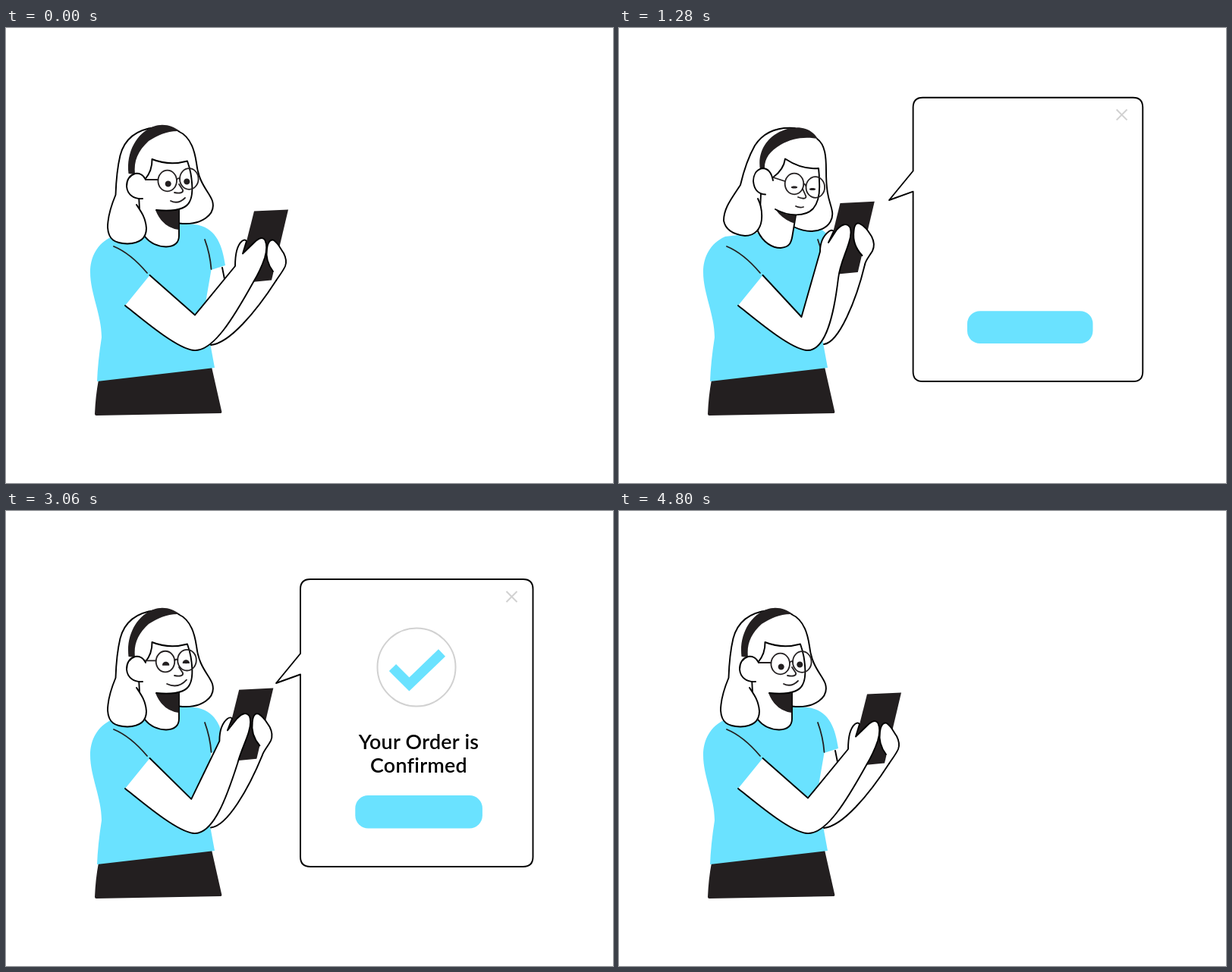
These frames come from a looping animation (800 px wide and 600 px high, 4.82 s). An HTML page:

```html
<!DOCTYPE html>
<html lang="en">
<head>
<meta charset="utf-8">
<title>Order confirmed</title>
<style>
  html, body { margin: 0; width: 100%; height: 100%; overflow: hidden; background: #fff; }
  svg { display: block; width: 100%; height: 100%; }
  .line { fill: none; stroke: #000; stroke-width: 1.9; stroke-linecap: round; stroke-linejoin: round; }
  .skin { fill: #fff; }
  .thin { stroke: #231f20; stroke-width: 1.8; }
  .ink { fill: #231f20; }
  .blue { fill: #6ae2ff; }
  .grey { fill: none; stroke: #d1d1d1; stroke-width: 2; }
  .tick { fill: none; stroke: #6ae2ff; stroke-width: 13; }
  text { font: 600 26.8px Lato, "Open Sans", sans-serif; letter-spacing: .3px; text-anchor: middle; }
</style>
</head>
<body>
<svg viewBox="0 0 800 600">
  <defs>
    <clipPath id="row1"><rect x="440" y="286" width="210" height="36"/></clipPath>
    <clipPath id="row2"><rect x="440" y="316" width="210" height="36"/></clipPath>
  </defs>

  <path class="ink" d="M122 464L271 447L284.3 506Q284.6 508 283 508L119 511Q117 511 117 509Q118 485 122 464Z"/>
  <path class="blue" d="M140 275C120 284 111 302 111 322C111 350 126 378 126 408Q121 440 120 466L275 448L268 410L262 368L270.5 319L289 313C285 285 276 262 248 259L220 256L183 270Z"/>
  <path class="line thin" d="M142 288Q164 297 186 323M262 279Q269 298 270.5 318"/>
  <path class="line" d="M285 316L288 331"/>

  <g id="head"></g>
  <g id="arms"></g>

  <g id="bubble">
    <path class="line skin" d="M388 188V103Q388 90 401 90H681.5Q694.5 90 694.5 103V456Q694.5 469 681.5 469H401Q388 469 388 456V215.5L356 227Z"/>
    <path class="grey" d="M659.5 106L673.5 120M673.5 106L659.5 120"/>
    <rect class="blue" x="460.3" y="375" width="167.6" height="43.5" rx="17"/>
    <circle id="ring" class="grey" cx="541" cy="206" r="51.5" pathLength="100" transform="rotate(-90 541 206)"/>
    <path id="tick" class="tick" pathLength="100" d="M509.5 206.5L531.5 228.5L574.5 187"/>
    <g clip-path="url(#row1)"><text id="text1" x="544" y="313.5">Your Order is</text></g>
    <g clip-path="url(#row2)"><text id="text2" x="544" y="344.7">Confirmed</text></g>
  </g>
</svg>
<script>
const LOOP = 4820;
const $ = id => document.getElementById(id);

// Each part: class, raised pose, lowered pose, optional smiling pose.
const headParts = [
  // right hair
  ['line skin',
    'M227 136C245 144 249 165 251 178C254 206 268 216 272 228C277 246 258 261 228 257.5',
    'M261 146C272 154 273 170 273 188C273 225 279 229 281 242C284 262 260 276 231 262.5'],
  // neck
  ['line skin',
    'M175 220L176 240L183 275C190 284 200 288 211 288.5C222 288 228 284 228 274L228 240',
    'M187 219L186 240L183 268C190 283 202 290 213 290C224 289 227 284 228.5 274L233 247'],
  // chin shadow
  ['ink',
    'M197 240Q212 242 227.5 239L227.5 266Q206 263 197 240Z',
    'M206 239Q218 247 233 246.5L231 257.5Q216 253 206 239Z'],
  // face
  ['line skin',
    'M183 200Q193 188 192.5 173Q215 182 239 175.5Q242 184 243.5 192C246 207 247 220 242 229C237 240 220 242 198 240',
    'M203 197Q217 187 219 172.5Q241 187 263 185Q264 193 264 203C265 219 262 231 256 238C246 249 224 249 206 239'],
  // left hair
  ['line skin',
    'M197 131C171 134 156 147 150.5 168C146 187 145 205 144.5 220C137 238 134 251 134 263C135 279 143 284 160 284.5C175 284 185 278 185 264C184 250 178 242 172 233',
    'M232 132C207 130 190 138 179 155C170 171 164 190 160 207C147 227 138 238 138 254C140 265 149 272 166 274C179 274 187 265 188 252C189 240 186 231 183 225'],
  // headband
  ['ink',
    'M161.5 192C158 163 173 138 194 130C207 125 220 129 229 136C214 135 200 141 188 149C174 162 168 175 170 193Z',
    'M186 187C182 163 195 142 219 134C234 129 252 130 262 146C245 143 228 145 213 154C198 163 191 173 192 187Z'],
  // ear
  ['line skin',
    'M184 200C181 193 175 191 170 192C161 195 159 202 159 209C160 220 169 226 180 225',
    'M203 201C201 191 196 185 189 185C180 187 177 195 177 202C178 213 184 219 193 219.5'],
  // nose and mouth
  ['line thin',
    'M228 206L233 213.5C234 217 230 218.5 222 217',
    'M242 212L246 221C248 225 243 226 236 223'],
  ['line thin',
    'M217 228Q227 233 236 224',
    'M233 235Q238 237.5 243 236',
    'M209.5 228Q227 236 239 222'],
  // glasses bridge and temple
  ['line thin',
    'M184 200L200.5 200M225 200Q227 197 229 199',
    'M203 197L218.5 202M243.5 206Q245 205 246 208',
    'M183 196L196 196M221 196Q222 193 225 195']
];

const armParts = [
  // far arm
  ['line skin',
    'M270 418C294 416 329 375 356 333',
    'M270 417C290 415 313 358 324 312'],
  // phone
  ['ink',
    'M327 241.5L372 239.5L350 332.5L303 337Z',
    'M291.5 231L336.8 228.7L314.8 322L268 326.5Z'],
  // far hand
  ['line skin',
    'M352 321C346 313 342 303 344 291C345 282 349 278 353 280C359 284 361 290 366 297C369 303 370 309 368 314C365 321 359 328 356 333',
    'M320.5 300C312 291 308 280 309.5 268C310 260 313 256 317 258C324 261 328 267 333 275C336 281 337 288 334 294C330 301 325 306 324 312'],
  // near arm and hand
  ['line skin',
    'M189.5 326L249 378.5L302 314C302 301 304 287 311 281Q315 278 317 281L312 297.5L327 283Q337 273 341.5 280C345 288 343 296 341 303C338 312 332 325 326 335C301 380 273 428 247 425C226 423 183 387 157 366',
    'M189.5 326L240.5 381L265 295C265 284 269 274 277 268Q281 265.5 283 268L276 283L287 266Q298 254 304.5 263C307 270 305 277 303 283C299 297 291 312 289 330C284 372 274 427 247 425C226 423 183 387 157 366']
];

// Lens centres and eye centres per pose.
const lenses = [
  [[212.7, 201.5], [231, 205.5], [208.5, 197]],
  [[241.3, 199], [258.8, 210], [237, 195.5]]
];
const eyes = [
  [[213.7, 205.5], [231, 210], [209, 202.5]],
  [[238.3, 202.5], [255, 212.5], [236.8, 200]]
];
// Eye half width, upper control, lower control.
const eyeShape = [[4, -5.3, 5.3], [4.2, -2, 2], [5, -6.8, -2.2]];

const lerp = (a, b, k) => a + (b - a) * k;
const clamp = x => Math.min(1, Math.max(0, x));
const span = (t, a, b) => clamp((t - a) / (b - a));
const smooth = x => x * x * (3 - 2 * x);
const ease = (t, a, b) => smooth(span(t, a, b));
const nums = (a, b, k) => a.map((v, i) => lerp(v, b[i], k));
const pose = ([a, b, c], down, smile) => nums(nums(a, b, down), c, smile);

function mix(a, b, k) {
  const to = b.match(/-?[\d.]+/g);
  let i = 0;
  return a.replace(/-?[\d.]+/g, v => lerp(+v, +to[i++], k).toFixed(2));
}

// Quick start with a long soft landing.
function pop(x) {
  let lo = 0, hi = 1;
  for (let i = 0; i < 24; i++) {
    const s = (lo + hi) / 2, r = 1 - s;
    if (.99 * s * r * r + .3 * s * s * r + s * s * s < x) lo = s; else hi = s;
  }
  return smooth(lo);
}

function add(parent, tag, cls) {
  const el = document.createElementNS('http://www.w3.org/2000/svg', tag);
  el.setAttribute('class', cls);
  return parent.appendChild(el);
}

const build = (parts, parent) =>
  parts.map(([cls, a, b, c]) => ({ el: add(parent, 'path', cls), a, b, c }));
const head = build(headParts, $('head'));
const arms = build(armParts, $('arms'));
const lensEls = lenses.map(() => {
  const el = add($('head'), 'ellipse', 'line thin');
  el.setAttribute('rx', 12.3);
  el.setAttribute('ry', 13.8);
  return el;
});
const eyeEls = eyes.map(() => add($('head'), 'path', 'ink'));

function pull(parts, down, smile) {
  for (const { el, a, b, c } of parts) {
    const d = mix(a, b, down);
    el.setAttribute('d', c ? mix(d, c, smile) : d);
  }
}

function reveal(id, k) {
  const el = $(id);
  el.style.visibility = k > 0 ? 'visible' : 'hidden';
  el.setAttribute('stroke-dasharray', k < 1 ? `${100 * k} 200` : 'none');
}

function draw(t) {
  const down = ease(t, 560, 1000) - ease(t, 2500, 3000);
  const lids = ease(t, 640, 1080) - ease(t, 2500, 3000);
  const smile = ease(t, 2700, 3300) - ease(t, 4320, 4780);
  pull(head, down, smile);
  pull(arms, ease(t, 0, 1000) - ease(t, 2600, 3600), 0);

  lensEls.forEach((el, i) => {
    const [x, y] = pose(lenses[i], down, smile);
    el.setAttribute('cx', x);
    el.setAttribute('cy', y);
  });
  const [w, up, low] = pose(eyeShape, lids, smile);
  eyeEls.forEach((el, i) => {
    const [x, y] = pose(eyes[i], down, smile);
    el.setAttribute('d', `M${-w} 0C${-w} ${up} ${w} ${up} ${w} 0C${w} ${low} ${-w} ${low} ${-w} 0Z`);
    el.setAttribute('transform', `translate(${x} ${y})`);
  });

  const size = t < 2700 ? pop(span(t, 806, 1374)) : pop(1 - span(t, 4032, 4600));
  const open = size > .002;
  $('bubble').style.visibility = open ? 'visible' : 'hidden';
  $('bubble').setAttribute('transform', `translate(356 227) scale(${size}) translate(-356 -227)`);
  reveal('ring', open ? ease(t, 1400, 1970) : 0);
  reveal('tick', open ? ease(t, 2440, 2920) : 0);
  $('text1').setAttribute('transform', `translate(0 ${32 * (1 - ease(t, 1960, 2400))})`);
  $('text2').setAttribute('transform', `translate(0 ${32 * (1 - ease(t, 2140, 2580))})`);
}

const start = performance.now();
function tick() {
  draw((performance.now() - start) % LOOP);
  requestAnimationFrame(tick);
}
draw(0);
requestAnimationFrame(tick);
</script>
</body>
</html>
```
